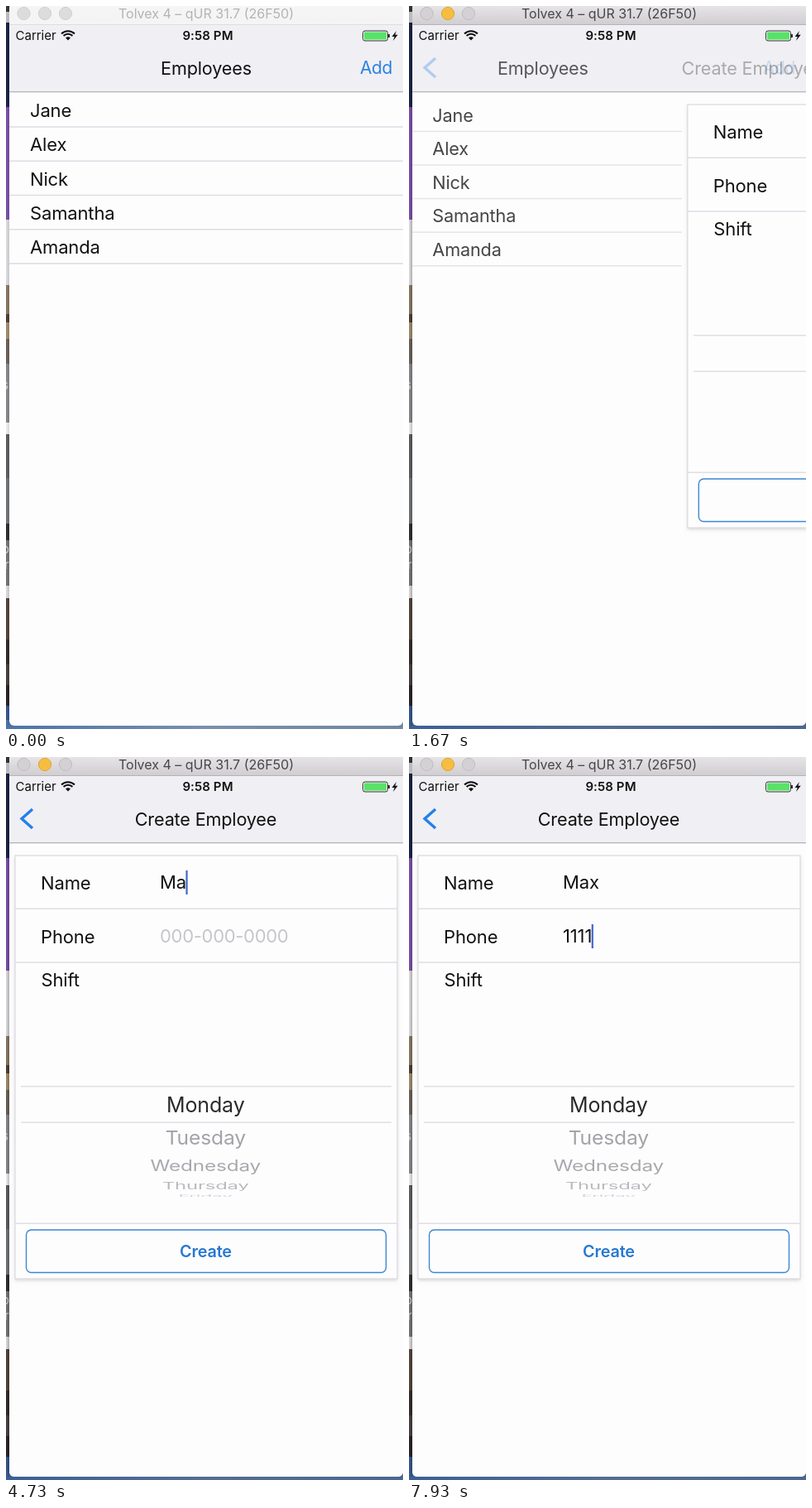
An HTML page with a canvas that plays this animation: 480x873 px, repeating every 8000 ms.

```html
<!DOCTYPE html>
<html lang="en">
<head>
<meta charset="utf-8">
<title>Create employee</title>
<style>
html, body { margin: 0; width: 100%; height: 100%; overflow: hidden; background: #fff; }
canvas { display: block; width: 480px; height: 873px; }
</style>
</head>
<body>
<canvas id="stage" width="480" height="873"></canvas>
<script>
const ctx = document.getElementById('stage').getContext('2d');
const LOOP = 8000, LEFT = 4, WIDTH = 476;
const BLUE = '#2a82e4', LINE = '#dfdee4', PAPER = '#fefdfe', INK = '#111';
const STAFF = ['Jane', 'Alex', 'Nick', 'Samantha', 'Amanda'];

// Moments of the interaction, in ms
const ACTIVATE = 1270, PRESS = 1345, PUSH = 1530, PUSH_END = 1885;
const FOCUS_NAME = 2400, FOCUS_PHONE = 6500;
const NAME_KEYS = [4270, 4600, 5000], PHONE_KEYS = [7270, 7470, 7670, 7870];

const clamp = v => Math.max(0, Math.min(1, v));
const ramp = (t, a, b) => clamp((t - a) / (b - a));
const easeInOut = p => p < .5 ? 2 * p * p : 1 - 2 * (1 - p) ** 2;

function rect(x, y, w, h, color) {
  ctx.fillStyle = color;
  ctx.fillRect(x, y, w, h);
}

function disc(x, y, r, fill, edge) {
  ctx.beginPath();
  ctx.arc(x, y, r, 0, 7);
  ctx.fillStyle = fill;
  ctx.fill();
  if (edge) {
    ctx.strokeStyle = edge;
    ctx.lineWidth = 1;
    ctx.stroke();
  }
}

function path(points, color, width) {
  ctx.beginPath();
  points.forEach(([x, y]) => ctx.lineTo(x, y));
  ctx.strokeStyle = color;
  ctx.lineWidth = width;
  ctx.stroke();
}

function text(str, x, y, size, color, { align = 'left', weight = 400, track = -.15 } = {}) {
  ctx.font = `${weight} ${size}px Inter, sans-serif`;
  ctx.letterSpacing = track + 'px';
  ctx.textAlign = align;
  ctx.fillStyle = color;
  ctx.fillText(str, x, y);
  return ctx.measureText(str).width;
}

function faded(alpha, draw) {
  if (alpha <= 0) return;
  ctx.save();
  ctx.globalAlpha *= alpha;
  draw();
  ctx.restore();
}

function clipTo(x, y, w, h, draw) {
  ctx.save();
  ctx.beginPath();
  ctx.rect(x, y, w, h);
  ctx.clip();
  draw();
  ctx.restore();
}

// Sliver of the desktop to the left of and below the window
function desktop(active) {
  const bands = [
    [0, '#d8d7d9'], [7, '#b9b9bf'], [20, '#1c2549'], [122, '#7d52ab'], [258, '#dedde0'],
    [337, '#8d7a63'], [372, '#4f4235'], [382, '#a58e6c'], [402, '#6e645c'], [432, '#8b8a8e'],
    [503, '#f0f0f1'], [517, '#5f6064'], [570, '#73777a'], [625, '#313134'], [645, '#77777b'],
    [700, '#dcdcde'], [715, '#57463c'], [765, '#352d2c'], [795, '#4a4240'], [820, '#2c2428'],
    [845, '#35598f']
  ];
  bands.forEach(([y, color], i) => rect(0, y, 12, (bands[i + 1] || [873])[0] - y, color));
  rect(0, 0, 4, 7, '#333');
  const floor = ctx.createLinearGradient(0, 0, 480, 0);
  floor.addColorStop(0, active ? '#3c5f96' : '#4b74a8');
  floor.addColorStop(.5, active ? '#546d93' : '#7890ae');
  floor.addColorStop(1, active ? '#4b6790' : '#7187a5');
  rect(0, 862, 480, 11, floor);
  clipTo(0, 400, 4, 300, () => {
    text('s', -5, 463, 15, '#d5d5d8');
    text('o', -5, 661, 15, '#d5d5d8');
    text('r', -2, 680, 15, '#d5d5d8');
  });
  const shade = ctx.createLinearGradient(0, 0, 4, 0);
  shade.addColorStop(0, 'rgba(0,0,0,0)');
  shade.addColorStop(1, active ? 'rgba(0,0,0,.22)' : 'rgba(0,0,0,.1)');
  rect(0, 20, 4, 849, shade);
}

function titleBar(active) {
  const g = ctx.createLinearGradient(0, 0, 0, 22);
  g.addColorStop(0, active ? '#e6e4e6' : '#f6f5f6');
  g.addColorStop(1, active ? '#d0ced0' : '#f5f4f5');
  rect(LEFT, 0, WIDTH, 22, g);
  rect(LEFT, 22, WIDTH, 1, active ? '#b5b3b6' : '#dddcdf');
  [21.5, 47, 72].forEach((x, i) => {
    if (active && i === 1) disc(x, 9, 7.6, '#f6be40', '#dea236');
    else disc(x, 9, 7.6, active ? '#d3d1d3' : '#dddcdd', active ? '#bebcbe' : '#cfcecf');
  });
  text('Tolvex 4 – qUR 31.7 (26F50)', 242, 15, 16, active ? '#474648' : '#b4b3b5',
    { align: 'center', track: 0 });
}

function statusBar() {
  text('Carrier', 11.5, 41, 15, INK, { track: 0 });
  text('9:58 PM', 244, 41, 15, INK, { align: 'center', weight: 600, track: .1 });

  [4.2, 7.7, 11.2].forEach((r, i) => {
    ctx.beginPath();
    if (i === 0) ctx.moveTo(75, 41.5);
    ctx.arc(75, 41.5, r, -Math.PI * .75, -Math.PI * .25);
    ctx.fillStyle = ctx.strokeStyle = INK;
    ctx.lineWidth = 2.1;
    if (i === 0) ctx.fill(); else ctx.stroke();
  });

  ctx.beginPath();
  ctx.roundRect(431.5, 30, 30, 12, 2.5);
  ctx.strokeStyle = '#333';
  ctx.lineWidth = 1;
  ctx.stroke();
  rect(433, 31.5, 27, 9, '#58e267');
  rect(462, 34, 2, 4, '#333');
  ctx.beginPath();
  [[472, 30], [466.5, 37], [469.7, 37], [468, 42], [473.7, 34.7], [470.4, 34.7]]
    .forEach(([x, y]) => ctx.lineTo(x, y));
  ctx.fillStyle = INK;
  ctx.fill();
}

function navBar(t, p) {
  rect(LEFT, 23, WIDTH, 80, '#f0eff3');
  rect(LEFT, 103, WIDTH, 1.3, '#b4b3b8');
  statusBar();
  const title = { align: 'center' };
  faded(1 - p, () => {
    text('Employees', 242 - 254 * p, 83, 21.6, INK, title);
    faded(1 - .7 * ramp(t, PRESS, PRESS + 120), () =>
      text('Add', 467, 82, 21, BLUE, { align: 'right', track: -.4 }));
  });
  faded(p, () => {
    text('Create Employee', 241.5 + 254 * (1 - p), 83, 21.6, INK, title);
    path([[32, 63], [19, 74.5], [32, 86]], '#2181ea', 3.4);
  });
}

function staffList(p) {
  ctx.save();
  ctx.translate(242 - 12.7 * p, 486);
  ctx.scale(1 - .05 * p, 1 - .05 * p);
  ctx.translate(-242, -486);
  faded(1 - .7 * p, () => STAFF.forEach((name, i) => {
    const y = 134 + i * 41.25;
    text(name, 29, y, 22, INK);
    rect(LEFT, y + 11.2, WIDTH, 1.6, LINE);
  }));
  ctx.restore();
}

// Steady after each reset, then one dip per second
function caretAlpha(t, resets) {
  const last = resets.filter(r => r <= t).pop();
  const phase = (t - last) % 1000;
  return 1 - ramp(phase, 600, 700) + ramp(phase, 780, 860);
}

function field(t, label, hint, value, keys, baseline, focus, blur) {
  text(label, 42, baseline + 1, 22, INK);
  const typed = value.slice(0, keys.filter(k => k <= t).length);
  const width = text(typed || hint, 186, baseline, 22, typed ? INK : '#c6c5ca',
    { track: typed ? -.15 : -.3 });
  if (t >= focus && t < blur) {
    faded(caretAlpha(t, [focus, ...keys]), () =>
      rect(typed ? 185.5 + width : 186, baseline - 22, 2.2, 29, '#4268c8'));
  }
}

function dayWheel() {
  rect(18, 397, 448, 1.5, LINE);
  rect(18, 440.5, 448, 1.5, LINE);
  // name, baseline, size, vertical foreshortening, color
  const days = [
    ['Monday', 428.5, 25, 1, '#2a2a2c'],
    ['Tuesday', 468, 24.6, .95, '#a3a2a7'],
    ['Wednesday', 500, 24.3, .74, '#a9a8ad'],
    ['Thursday', 522, 23.8, .47, '#bab9be'],
    ['Friday', 532, 22.8, .22, '#d3d2d7']
  ];
  clipTo(18, 300, 448, 231, () => days.forEach(([name, y, size, squash, color]) => {
    ctx.save();
    ctx.translate(241.3, y);
    ctx.scale(1, squash);
    text(name, 0, 0, size, color, { align: 'center' });
    ctx.restore();
  }));
}

function form(t) {
  ctx.save();
  ctx.shadowColor = 'rgba(0,0,0,.16)';
  ctx.shadowBlur = 4;
  ctx.shadowOffsetY = 2;
  rect(11, 119, 462, 511, PAPER);
  ctx.restore();
  ctx.strokeStyle = '#dddce1';
  ctx.lineWidth = 1.3;
  ctx.strokeRect(11, 119, 462, 511);
  [182.5, 247.2, 562.5].forEach(y => rect(11, y, 462, 1.5, LINE));

  field(t, 'Name', 'Jane', 'Max', NAME_KEYS, 159, FOCUS_NAME, FOCUS_PHONE);
  field(t, 'Phone', '000-000-0000', '1111', PHONE_KEYS, 224, FOCUS_PHONE, LOOP);
  text('Shift', 42.5, 277, 22, INK);
  dayWheel();

  ctx.beginPath();
  ctx.roundRect(24.5, 571, 435, 51.5, 6);
  ctx.strokeStyle = '#3c86d2';
  ctx.lineWidth = 1.4;
  ctx.stroke();
  text('Create', 241.5, 604, 19.8, '#2778d0', { align: 'center', weight: 600 });
}

function draw(t) {
  const active = t >= ACTIVATE;
  const p = easeInOut(ramp(t, PUSH, PUSH_END));
  const slide = WIDTH * (1 - p);
  desktop(active);

  ctx.save();
  ctx.beginPath();
  ctx.roundRect(LEFT, 0, WIDTH, 869, [4, 0, 6, 6]);
  ctx.clip();
  rect(LEFT, 0, WIDTH, 869, PAPER);
  if (p < 1) staffList(p);
  if (p > 0) {
    ctx.save();
    ctx.translate(slide, 0);
    rect(LEFT, 104, WIDTH, 765, PAPER);
    form(t);
    ctx.restore();
  }
  navBar(t, p);
  titleBar(active);
  ctx.restore();
}

function tick() {
  draw(performance.now() % LOOP);
  requestAnimationFrame(tick);
}
tick();
</script>
</body>
</html>
```
